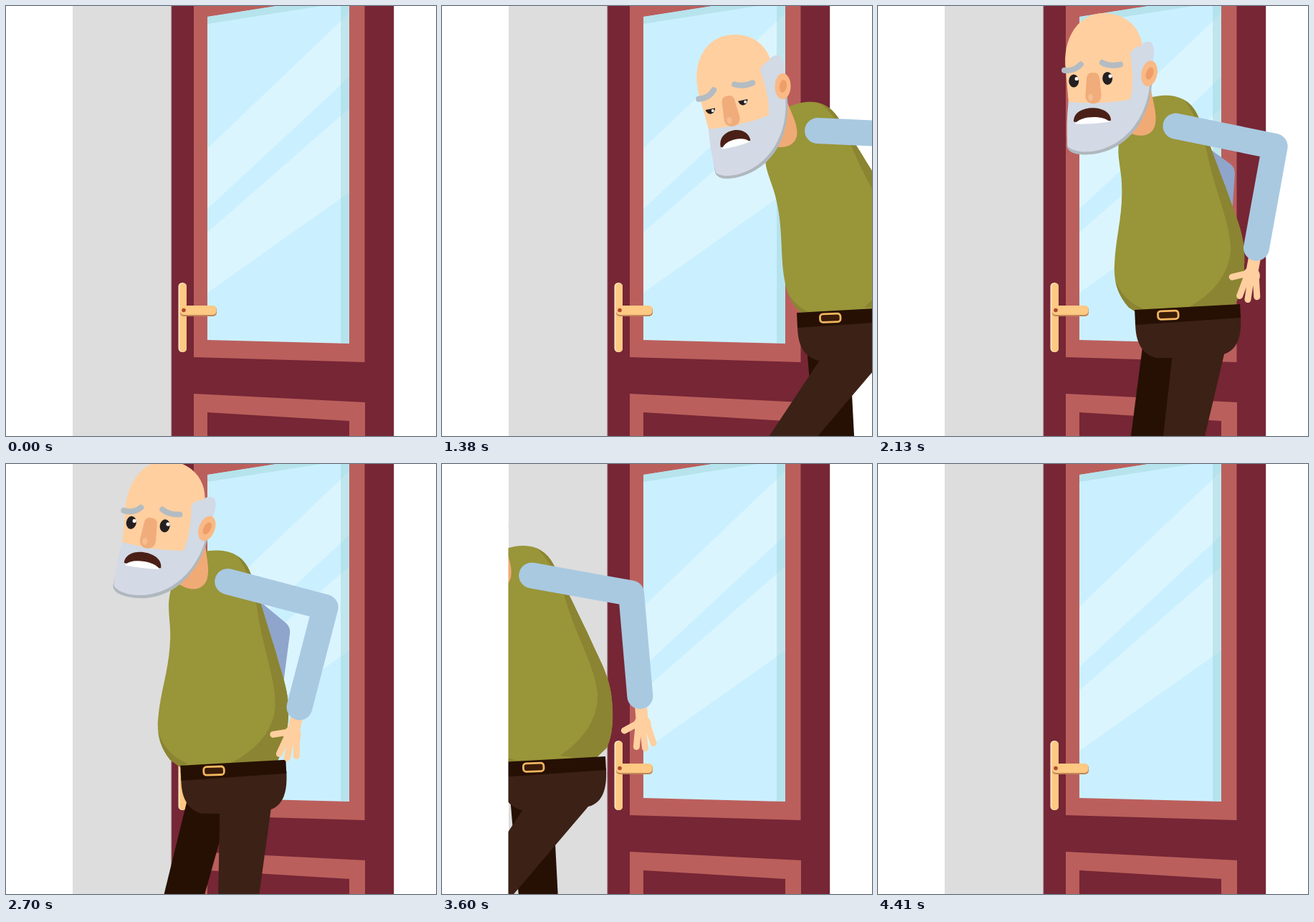
Animation, 600 px wide and 600 px high, one loop 5.13 s. Source, as an HTML page:

```html
<!DOCTYPE html>
<html lang="en">
<head>
<meta charset="utf-8">
<title>Old man walking past a door</title>
<style>
html, body { margin: 0; width: 100%; height: 100%; overflow: hidden; background: #fff; }
svg { display: block; width: 100vw; height: 100vh; }
</style>
</head>
<body>
<svg viewBox="0 0 600 600">
  <defs>
    <linearGradient id="beardTint" x1="0" y1="0" x2="0" y2="1">
      <stop offset=".5" stop-color="#d1dae5"/><stop offset="1" stop-color="#d5d9e6"/>
    </linearGradient>
    <clipPath id="torsoClip"><use href="#torsoShape"/></clipPath>
    <clipPath id="glassClip"><path d="M281 15L377 0H479V471L281 466Z"/></clipPath>
  </defs>

  <rect x="93" width="138" height="600" fill="#ddd"/>
  <g id="door">
    <rect x="231" width="310" height="600" fill="#762635"/>
    <path d="M231 0V600" stroke="#8d5965"/>
    <path d="M541.5 0V600" stroke="#dccdd1"/>
    <path d="M262 0H500.5V497L262 490Z" fill="#bb5f5c"/>
    <g clip-path="url(#glassClip)">
      <rect x="281" width="198" height="480" fill="#caf0ff"/>
      <path d="M281 199L479 10V99L281 283ZM281 316L479 143V260L281 400Z" fill="#dbf5ff"/>
      <path d="M281 15L377 0H440L281 25Z" fill="#b6e3ec"/>
      <path d="M467 0H479V480H467Z" fill="#8cc8cc" opacity=".35"/>
    </g>
    <path d="M262 541L501 553V600H262Z" fill="#bb5f5c"/>
    <path d="M281 567L479 579V600H281Z" fill="#762635"/>
    <rect x="240.5" y="386" width="11.5" height="97" rx="5.5" fill="#ffe6c4"/>
    <rect x="242.5" y="387" width="9.5" height="96" rx="4.7" fill="#fdc983"/>
    <rect x="243" y="419" width="51" height="14" rx="5" fill="#c08457"/>
    <rect x="243" y="418" width="50.5" height="13" rx="5" fill="#fdc983"/>
    <circle cx="248" cy="424.5" r="2.8" fill="#b0492f"/>
  </g>

  <g id="man">
    <g id="body">
      <path id="farArm" d="M28 -240L84 -199L78 -110" fill="none" stroke="#8fa5cb" stroke-width="34" stroke-linecap="round" stroke-linejoin="round"/>
      <path id="farLeg" d="M-30 -5H30L26 230H-26Z" fill="#261003"/>
      <path id="nearLeg" d="M-37 -5H37L23 230H-23Z" fill="#3c2116"/>
      <g id="torso"><g transform="translate(-404 -432)">
        <path id="torsoShape" fill="#999539" d="M335 205C334 165 355 130 385 126C415 120 436 130 446 153C455 174 459 183 467 205C478 235 486 254 493 275C504 305 513 325 511 362C510 385 506 402 498 416L460 446H390L350 420C335 403 329 385 330 362C331 325 341 295 340 255C340 235 336 222 335 205Z"/>
        <g clip-path="url(#torsoClip)" fill="#8b8432">
          <path d="M415 120C440 140 446 165 458 200C468 255 492 300 492 340C490 375 466 402 432 421L520 440V150Z"/>
          <path d="M328 375C337 400 350 415 375 424L340 440Z"/>
        </g>
        <path d="M338 140L380 112C382 132 390 150 386 166C381 183 362 184 346 174Z" fill="#f0aa76"/>
      </g></g>
      <g transform="translate(-404 -432)">
        <path d="M358 443L506 433C507 455 505 478 485 486C460 493 420 492 388 492C370 487 359 473 359 443Z" fill="#3c2116"/>
        <path d="M358 425L505 417L506 436L359 446Z" fill="#261003"/>
        <rect x="390.5" y="426.5" width="28.5" height="11.5" rx="4" fill="#3a1c08" stroke="#f2b65f" stroke-width="2.8" transform="rotate(-2 404 432)"/>
      </g>
    </g>

    <g id="hand" fill="none" stroke="#ffcf9f" stroke-linecap="round">
      <path d="M0 5V34" stroke-width="17"/>
      <path d="M-3 36L-26 46M-6 42L-11 70M0 42L1 73M7 42L13 67" stroke-width="9"/>
      <ellipse cy="40" rx="12" ry="13" fill="#ffcf9f" stroke="none"/>
    </g>
    <path id="arm" fill="none" stroke="#a9c9e1" stroke-width="36" stroke-linecap="round" stroke-linejoin="round"/>

    <g id="head"><g transform="translate(-378 -94)">
      <path d="M262 88C257 42 282 9 315 9C347 9 369 30 370 62L362 145H266Z" fill="#ffcf9f"/>
      <path d="M264 150L262 194Q264 205 285 206C335 208 380 170 383 95L370 110L345 160Z" fill="#afb8be"/>
      <path d="M265 132Q310 137 351 130Q358 105 352 66Q356 57 366 56Q373 47 382 51Q387 58 385 70L379 110C372 168 330 204 285 202Q270 201 263 194Q261 165 265 132Z" fill="url(#beardTint)"/>
      <ellipse cx="378.5" cy="94" rx="11" ry="18" fill="#fab985" transform="rotate(12 378 94)"/>
      <ellipse cx="379" cy="94" rx="5" ry="9" fill="#ee9e68" transform="rotate(20 379 94)"/>
      <path d="M291 98Q293 91 300 92Q308 91 309 100L311 123Q311 135 299 135Q288 134 289 122Z" fill="#f0ac7a"/>
      <ellipse cx="296" cy="126" rx="3.5" ry="5" fill="#f6bd90"/>
      <g id="eyes"></g>
      <path d="M260 88Q274 90 283 80M313 78Q323 84 338 81" fill="none" stroke="#b2bcc2" stroke-width="8" stroke-linecap="round"/>
      <g id="mouth">
        <path d="M-26 2C-27 -23 26 -23 26 1Q0 6 -26 2Z" fill="#4a2016"/>
        <path d="M-24 5C-18 -7 18 -7 24 3Q0 6 -24 5Z" fill="#fff"/>
      </g>
    </g></g>
  </g>
  <rect width="92.5" height="600" fill="#fff"/>
</svg>

<script>
const LOOP = 5130, STEP = 30, ENTER = 150, LEAVE = 4410;
const STRIDE = 2.22;     // seconds per walk cycle
const LUNGE = 1380;      // time of the deepest forward lunge, ms
const UPPER_ARM = 141, FOREARM = 144;
const SHOULDER = { x: 11, y: -145 };   // from the chest pivot

const $ = id => document.getElementById(id);
const place = (id, value) => $(id).setAttribute('transform', value);

function ease(u) {
  const v = Math.min(1, Math.max(0, u));
  return v * v * (3 - 2 * v);
}

function addEye(x, y) {
  $('eyes').insertAdjacentHTML('beforeend',
    `<g transform="translate(${x} ${y})">
      <ellipse rx="7" ry="9" fill="#241f20"/>
      <circle cx="4" cy="-3" r="2.6" fill="#fff"/>
      <circle class="glint" cx="3" cy="5" r="2" fill="#fff"/>
      <rect class="lid" x="-9" y="-11" width="18" height="0" fill="#ffcf9f"/>
    </g>`);
}
addEye(273, 103);
addEye(320, 100);

function polar([x, y], length, degrees) {
  const a = degrees * Math.PI / 180;
  return [x + length * Math.cos(a), y + length * Math.sin(a)];
}

// Every part follows a steady drift plus a swing of the walk cycle, which is zero at the lunge.
function poseAt(t) {
  const s = (t - LUNGE) / 1000;
  const phase = 2 * Math.PI * s / STRIDE;
  const swing = (rise, lead = 0) => rise * (1 - Math.cos(phase)) + lead * Math.sin(phase);
  const pace = -8.5 * s * (s - STRIDE);
  const reach = 1 - ease((t - 750) / 600);   // hand rests on the belly while he enters
  return {
    x: 541 - 186.5 * s + pace + swing(-7, 5),
    y: 435 - 5.4 * s,
    lean: -11 + 2.7 * s + swing(6),
    sink: 3.5 - 2.5 * s,
    earX: 475 - 177.5 * s + pace + swing(16.5, 2),
    earY: 112 - 11.3 * s + swing(-4.8, -2.5),
    tilt: -11.5 + swing(9.8, -5),
    upper: 2.6 + 3.4 * s + swing(4.2) + 37 * reach,
    fore: 82 + 1.4 * s + swing(11.3) + 40 * reach,
    near: 37 + swing(-17.8),
    far: -4 + swing(9.5, -2.5),
    farShift: -50 + swing(28),
    mouth: Math.min(1, .82 + .25 * s),
    blink: Math.max(0, 1 - Math.abs(s) / .12)
  };
}

function draw(t) {
  const visible = t >= ENTER && t < LEAVE;
  $('man').style.display = visible ? '' : 'none';
  if (!visible) return;

  const p = poseAt(t);
  const chest = `translate(0 ${p.sink}) rotate(${p.lean} 0 -120)`;
  place('body', `translate(${p.x} ${p.y})`);
  place('torso', chest);
  place('farArm', `${chest} translate(${p.farShift} 0)`);
  place('nearLeg', `translate(46 35) rotate(${p.near})`);
  place('farLeg', `translate(-3 30) rotate(${p.far})`);

  const lean = p.lean * Math.PI / 180;
  const shoulder = [
    p.x + SHOULDER.x * Math.cos(lean) - SHOULDER.y * Math.sin(lean),
    p.y + p.sink - 120 + SHOULDER.x * Math.sin(lean) + SHOULDER.y * Math.cos(lean)
  ];
  const elbow = polar(shoulder, UPPER_ARM, p.upper);
  const wrist = polar(elbow, FOREARM, p.fore);
  $('arm').setAttribute('d', `M${shoulder}L${elbow}L${wrist}`);
  place('hand', `translate(${wrist}) rotate(${p.fore - 90})`);

  place('head', `translate(${p.earX} ${p.earY}) rotate(${p.tilt})`);
  place('mouth', `translate(298 158) scale(${p.mouth} ${1.2 - .2 * p.mouth})`);
  document.querySelectorAll('.lid').forEach(lid => lid.setAttribute('height', 13 * p.blink));
  document.querySelectorAll('.glint').forEach(glint => glint.setAttribute('opacity', p.blink));
}

const start = performance.now();
function tick() {
  const t = (performance.now() - start) % LOOP;
  draw(Math.floor(t / STEP) * STEP);
  requestAnimationFrame(tick);
}
tick();
</script>
</body>
</html>
```
